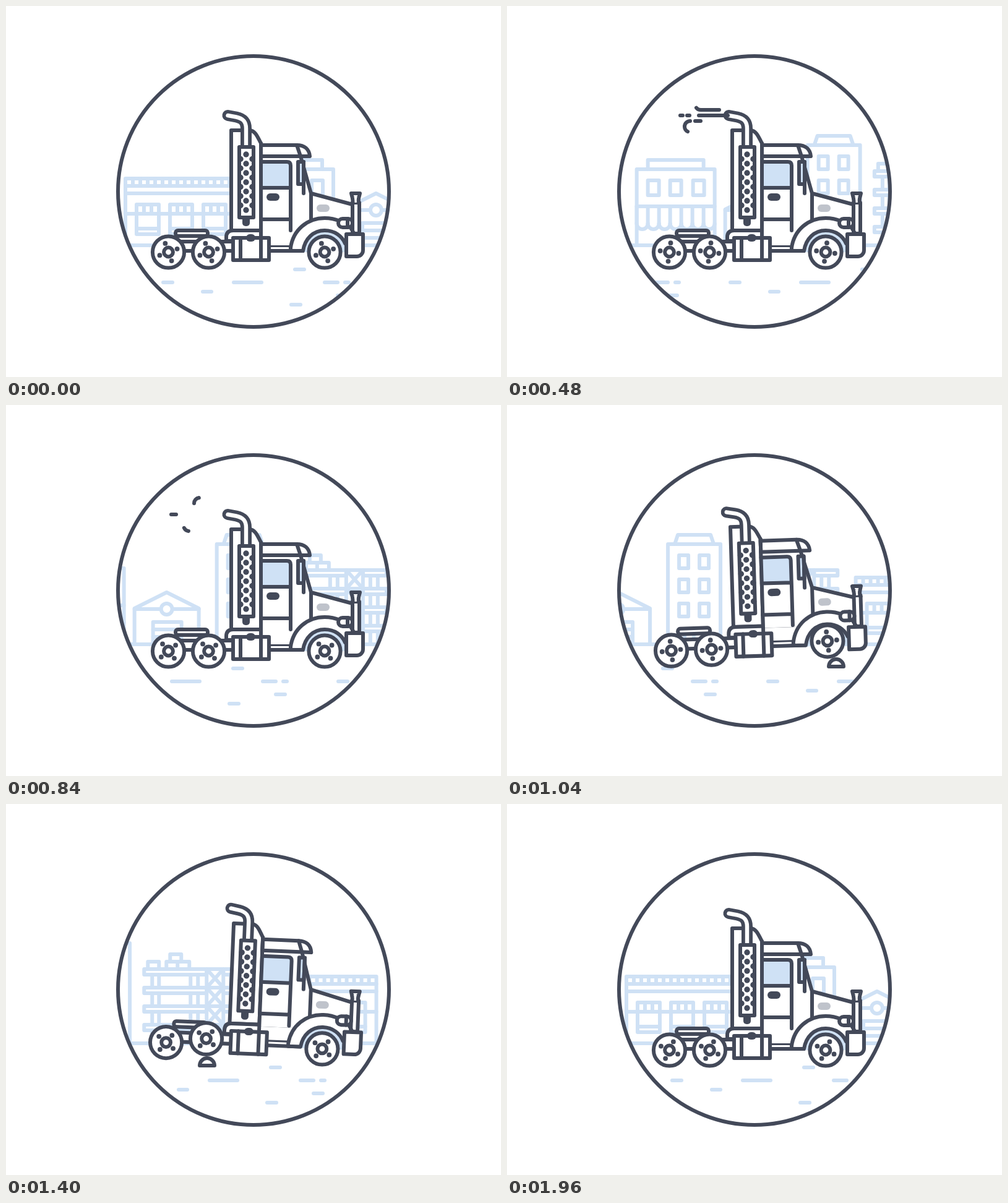
Animation of 800 by 600 pixels, one loop 2 s. Source, as an HTML page with a canvas:

```html
<!DOCTYPE html>
<html lang="en">
<head>
<meta charset="utf-8">
<title>Truck</title>
<style>
html, body { margin: 0; width: 100%; height: 100%; overflow: hidden; background: #fff; }
canvas { display: block; width: 800px; height: 600px; }
</style>
</head>
<body>
<canvas id="stage" width="800" height="600"></canvas>
<script>
const c = document.getElementById('stage').getContext('2d');
const DARK = '#434959', PALE = '#cfe1f5', WHITE = '#fff', GREY = '#bfc3cb';
const LOOP = 2000, STEP = 40;
const CITY_W = 789.5, CITY_V = CITY_W / 1960, ROAD_V = 0.575;

// ---------- helpers ----------
function shape(d, fill, stroke) {
  const p = new Path2D(d);
  if (fill) { c.fillStyle = fill; c.fill(p); }
  if (stroke) { c.strokeStyle = stroke; c.stroke(p); }
}
function box(x, y, w, h, r, fill, stroke) {
  c.beginPath();
  c.roundRect(x, y, w, h, r);
  if (fill) { c.fillStyle = fill; c.fill(); }
  if (stroke) { c.strokeStyle = stroke; c.stroke(); }
}
function disc(x, y, r, fill, stroke) {
  c.beginPath();
  c.arc(x, y, r, 0, Math.PI * 2);
  if (fill) { c.fillStyle = fill; c.fill(); }
  if (stroke) { c.strokeStyle = stroke; c.stroke(); }
}
const line = (x1, y1, x2, y2, col = DARK) => shape(`M${x1} ${y1}L${x2} ${y2}`, null, col);
const pale = (x1, y1, x2, y2) => line(x1, y1, x2, y2, PALE);
const frame = (x, y, w, h) => box(x, y, w, h, 0, null, PALE);

const smooth = u => (1 - Math.cos(Math.PI * u)) / 2;
function key(t, pts, ease = u => u) {
  if (t <= pts[0][0]) return pts[0][1];
  for (let i = 1; i < pts.length; i++) {
    const [t0, a] = pts[i - 1], [t1, b] = pts[i];
    if (t < t1) return a + (b - a) * ease((t - t0) / (t1 - t0));
  }
  return pts[pts.length - 1][1];
}

// ---------- city ----------
function store() {
  frame(0, 279, 180, 108);
  pale(0, 291, 180, 291);
  pale(0, 303, 180, 303);
  for (let x = 12; x < 180; x += 12) pale(x, 279, x, 291);
  for (const x of [18, 72, 126]) {
    frame(x, 321, 36, 48);
    pale(x, 336, x + 36, 336);
    pale(x, 360, x + 36, 360);
    pale(x + 12, 321, x + 12, 336);
    pale(x + 24, 321, x + 24, 336);
    pale(x - 18, 336, x, 336);
  }
  pale(162, 336, 180, 336);
}
function shop() {
  frame(0, 264, 126, 123);
  frame(18, 249, 90, 15);
  for (const x of [18, 54, 91]) frame(x, 282, 18, 24);
  pale(0, 324, 126, 324);
  for (let x = 0; x < 126; x += 18) {
    pale(x, 324, x, 352);
    shape(`M${x} 352a9 9 0 0 0 18 0`, null, PALE);
  }
}
function house() {
  shape('M0 387V329L52 303L104 329V387', null, PALE);
  pale(0, 330, 104, 330);
  disc(52, 330, 9, WHITE, PALE);
  frame(30, 351, 46, 36);
  pale(30, 363, 76, 363);
  pale(30, 375, 76, 375);
}
function flats() {
  frame(0, 225, 85, 162);
  shape('M11 225L16 210H69L74 225', null, PALE);
  for (const y of [243, 282, 321]) {
    frame(18, y, 15, 21);
    frame(51, y, 15, 21);
  }
  frame(27, 363, 30, 24);
  pale(42, 363, 42, 387);
}
function racks() {
  frame(6, 255, 18, 12);
  frame(36, 255, 37, 12);
  pale(54, 255, 54, 267);
  frame(42, 243, 18, 12);
  for (let y = 267; y < 387; y += 30) {
    frame(0, y, 101, 9);
    frame(128, y, 38, 9);
    for (const x of [13, 24, 75, 87, 140, 152]) pale(x, y + 9, x, Math.min(y + 30, 387));
    frame(101, y, 27, 30);
    shape(`M101 ${y}l27 30m0 -30l-27 30`, null, PALE);
  }
}
const CITY = [[store, 193], [shop, 403], [house, 546], [flats, 679], [racks, 787.2]];

function city(t) {
  pale(180, 387, 620, 387);
  for (const [draw, x0] of CITY) {
    for (const rep of [-1, 0, 1]) {
      const x = x0 + rep * CITY_W - CITY_V * t;
      if (x < 0 || x > 640) { if (x < -200 || x > 640) continue; }
      c.save();
      c.translate(x, 0);
      draw();
      c.restore();
    }
  }
}

// ---------- road ----------
const DASHES = [[-114, 447, 15], [-50, 462, 14], [0, 447, 45], [93, 483, 15],
  [99, 426, 15], [147, 447, 21], [168, 468, 15], [180, 447, 6]];

function road(t) {
  for (const start of [368, 751, 1134, 1508]) {
    for (const [dx, y, w] of DASHES) {
      const x = start + dx - ROAD_V * t;
      pale(x, y, x + w, y);
    }
  }
}
const bumpX = t => 440 - ROAD_V * (t - 1200);
function bump(t) {
  const x = bumpX(t);
  if (x > 150 && x < 650) shape(`M${x - 12} 423a12 12 0 0 1 24 0z`, WHITE, DARK);
}

// ---------- truck ----------
const TILT = [[960, 0], [1080, -2.35], [1200, 0], [1400, 2.35], [1500, 2.35], [1600, 0]];
const LIFT = [[960, 0], [1080, -6.7], [1200, -4.6], [1400, -6.7], [1500, -6.7], [1600, 0]];

function wheel(x0, t, tilt, lift) {
  const dx = x0 - 400, dy = 98;
  const x = 400 + dx * Math.cos(tilt) - dy * Math.sin(tilt);
  let y = 300 + dx * Math.sin(tilt) + dy * Math.cos(tilt) + lift;
  // ride over the bump: two circles touching
  const gap = x - bumpX(t), reach = 43.5;
  if (Math.abs(gap) < reach) y = Math.min(y, 423 - Math.sqrt(reach * reach - gap * gap));
  disc(x, y, 25.6, WHITE, DARK);
  disc(x, y, 7.4, WHITE, DARK);
  const turn = (70 + 24.8 * t / STEP) * Math.PI / 180 + tilt;
  for (let i = 0; i < 4; i++) {
    const a = turn + i * Math.PI / 2;
    disc(x + 15 * Math.cos(a), y + 15 * Math.sin(a), 3.9, DARK);
  }
}

function exhaust() {
  const pipe = 'M358.5 177L372 179.5C384 182 388 188 388 198V228';
  c.lineWidth = 18;
  shape(pipe, null, DARK);
  c.lineWidth = 6.4;
  shape(pipe, null, WHITE);
  c.lineWidth = 6;
  box(382, 340, 12, 16, 5, DARK);
  box(377, 228, 23, 114, 0, WHITE, DARK);
  for (let i = 0; i < 7; i++) {
    disc(388, 240 + i * 15, 4.7, DARK);
    if (i < 6) {
      disc(379, 247.5 + i * 15, 4.7, DARK);
      disc(398, 247.5 + i * 15, 4.7, DARK);
    }
  }
}

function body() {
  // rails and hitch
  box(264, 381, 110, 15, 0, WHITE, DARK);
  box(420, 387, 60, 9, 0, WHITE, DARK);
  box(274, 363, 52, 9, 4, WHITE, DARK);
  // sleeper
  shape('M364 363V201H394C402 202 405 208 412 222V363z', WHITE, DARK);
  shape('M356 380V374Q356 363 367 363H470V387H412V380z', WHITE);
  shape('M356 380V374Q356 363 367 363H466M356 380H368', null, DARK);
  // cab and hood
  shape('M412 243H476L493 303L560 321V366H412z', WHITE);
  shape('M412 225H470C482 225 490 231 491 243H412z', WHITE, DARK);
  line(470, 225, 476, 243);
  shape('M476 243L493 303L560 321M493 303V345', null, DARK);
  shape('M412 252H454Q460 252 460 258V294H412z', PALE);
  shape('M412 252H454Q460 252 460 258V363M412 294H460M412 345H460', null, DARK);
  box(421, 303, 21, 12, 6, DARK);
  box(502, 321, 21, 12, 6, GREY);
  box(472, 252, 9, 36, 0, PALE, DARK);
  line(481, 252, 481, 303);
  exhaust();
  // fuel tank
  box(367, 375, 58, 36, 0, WHITE, DARK);
  line(379, 375, 379, 411);
  line(412, 222, 412, 411);
  box(388, 369, 15, 12, 6, DARK);
  // fender
  shape('M481 396C483 376 497 363 515 363C531 363 543 372 548 386V398H481z', PALE);
  shape('M460 396V391C464 362 487 343 515 343C529 343 542 347 551 355L562 368L548 386C543 372 531 363 515 363C497 363 483 376 481 396z', WHITE);
  shape('M548 384C543 372 531 363 515 363C497 363 483 376 480 396H460V391C464 362 487 343 515 343C525 343 533 345 540 348', null, DARK);
  // front post, lamp, bumper
  box(560, 318, 11, 50, 0, WHITE, DARK);
  shape('M558 303H572L570 311H560z', WHITE, DARK);
  disc(565, 313, 5, WHITE);
  shape('M560 311Q561 316 560 320M570 311Q569 316 571 320', null, DARK);
  line(556, 357, 562, 367);
  box(537, 344, 23, 14, 7, WHITE, DARK);
  line(552, 344, 552, 358);
  box(550, 369, 27, 36, [0, 0, 10, 0], WHITE, DARK);
}

function truck(t) {
  const tilt = key(t, TILT, smooth) * Math.PI / 180;
  const lift = key(t, LIFT, smooth);
  c.save();
  c.translate(400, 300 + lift);
  c.rotate(tilt);
  c.translate(-400, -300);
  body();
  c.restore();
  for (const x of [262.5, 327.5, 515]) wheel(x, t, tilt, lift);
}

// ---------- smoke: path, tail keys, head keys ----------
const TOP = 'M357 168H313A9 9 0 0 1 304 159A9 9 0 0 1 312 150';
const MID = 'M357 177H267';
const LOW = 'M357 186H296A9 9 0 0 0 287 195A9 9 0 0 0 296 204';
const SMOKE = [
  [MID, [[188, 0], [548, 90]], [[172, 0], [532, 90]]],
  [MID, [[232, 0], [592, 90]], [[216, 0], [576, 90]]],
  [MID, [[512, 0], [872, 90]], [[292, 0], [652, 90]]],
  [TOP, [[420, 0], [480, 14], [840, 58], [940, 71]], [[272, 0], [480, 52], [580, 71]]],
  [LOW, [[250, 0], [480, 61], [620, 88]], [[200, 0], [480, 85], [500, 88]]],
  [LOW, [[380, 0], [480, 44], [840, 79], [940, 88]], [[340, 0], [480, 53], [820, 88]]]
];
function smoke(t) {
  c.save();
  for (const [d, tail, head] of SMOKE) {
    const a = key(t, tail), b = key(t, head);
    if (b - a < 0.5) continue;
    c.setLineDash([b - a, 9999]);
    c.lineDashOffset = -a;
    shape(d, null, DARK);
  }
  c.restore();
}

// ---------- scene ----------
function scene(t) {
  c.fillStyle = WHITE;
  c.fillRect(0, 0, 800, 600);
  c.lineWidth = 6;
  c.lineCap = c.lineJoin = 'round';
  c.save();
  c.beginPath();
  c.arc(400, 300, 219, 0, Math.PI * 2);
  c.clip();
  city(t);
  road(t);
  bump(t);
  truck(t);
  smoke(t);
  c.restore();
  disc(400, 300, 219, null, DARK);
}

const begin = performance.now();
function tick() {
  const t = (performance.now() - begin) % LOOP;
  scene(Math.floor(t / STEP) * STEP);
  requestAnimationFrame(tick);
}
tick();
</script>
</body>
</html>
```
